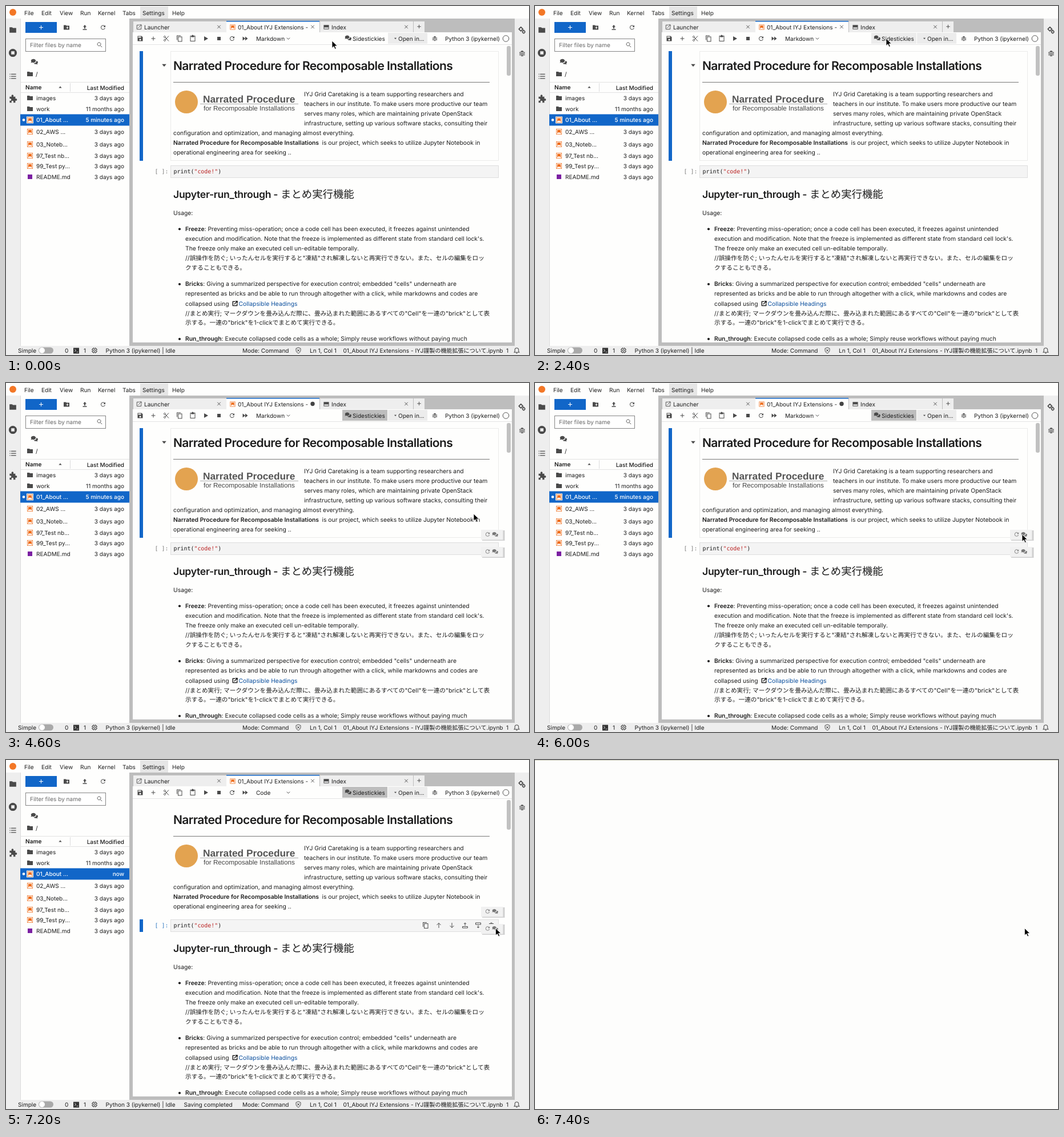
An HTML page for the animation above (8000 ms loop, 916 by 611 pixels).

```html
<!DOCTYPE html>
<html lang="en">
<head>
<meta charset="utf-8">
<title>Notebook side notes</title>
<style>
  html, body { margin: 0; width: 100%; height: 100%; overflow: hidden; background: #fefefd; }
  svg { display: block; width: 916px; height: 611px; }
  text { font: 10.05px Inter, "Noto Sans CJK JP", "Noto Sans CJK", sans-serif; fill: #1c1c1c;
         white-space: pre; text-rendering: geometricPrecision; }
  .body { font-size: 10.35px; }
  .jp { font-size: 10.65px; }
  .bold { font-weight: 600; }
  .medium { font-weight: 500; }
  .h1 { font-size: 21px; font-weight: 600; letter-spacing: -.58px; }
  .h2 { font-size: 17.6px; font-weight: 600; letter-spacing: -.3px; }
  .h2jp { font-size: 18.4px; }
  .mono { font: 9.95px "DejaVu Sans Mono", monospace; }
  .logo { font: bold 17.3px "Liberation Sans", sans-serif; fill: #555; }
  .sub { font: 11.7px "Liberation Sans", sans-serif; fill: #444; }
</style>
</head>
<body>
<svg id="stage" viewBox="0 0 916 611"></svg>
<script>
const BLUE = '#1166c8', INK = '#4a4a4a', GRAY = '#bdbdbd', LIGHT = '#eeeeee', PAPER = '#fefefd', ORANGE = '#ef6c1a';
const LOOP = 8000;

// Icon outlines on a 24-unit grid.
const SOLID = {
  folder: 'M10 4H2v16h20V6H12z',
  newFolder: 'M10 4H2v16h20V6H12zM14 9h2v3h3v2h-3v3h-2v-3h-3v-2h3z',
  save: 'M3 3h14l4 4v14H3zM5 5v4h10V5zM12 13a3 3 0 1 0 .1 0z',
  plus: 'M11 5h2v6h6v2h-6v6h-2v-6H5v-2h6z',
  play: 'M6 4v16l14-8z',
  stop: 'M4 4h16v16H4z',
  forward: 'M3 5v14l9-7zM12 5v14l9-7z',
  upload: 'M12 3l6 7h-4v6h-4v-6H6zM5 18h14v3H5z',
  refresh: 'M17.65 6.35A8 8 0 1 0 19.73 14h-2.08A6 6 0 1 1 16.2 7.8L13 11h7V4z',
  copy: 'M2 1h14v2H4v14H2zM6 5h15v18H6zM8 7v14h11V7z',
  paste: 'M3 2h6a3 3 0 0 1 6 0h6v20H3zM5 4v16h14V4h-2v3H7V4z',
  bubbles: 'M9 3a8 6 0 1 1-4 11.2L1 16l1.5-4A8 6 0 0 1 9 3zM19 9a6 5 0 0 1 2.5 9l1.5 3-4-1.3a8 6 0 0 1-9-2.7A10 8 0 0 0 19 9z',
  caretDown: 'M5 8h14l-7 8z',
  caretUp: 'M5 16h14l-7-8z',
  notebook: 'M2 2h20v20H2zM3.6 3.6v16.8h16.8V3.6zM6 6h12v12l-6-4.7L6 18z',
  terminal: 'M2 2h20v20H2zM6 7l4 4-4 4 1 1 5-5-5-5zM13 16h6v1.6h-6z',
  console: 'M2 4h20v16H2zM4 13v5h16v-5z',
  running: 'M12 2a10 10 0 1 1-.1 0zM8 8v8h8V8z',
  list: 'M3 5h2v2H3zM7 5h14v2H7zM3 11h2v2H3zM7 11h14v2H7zM3 17h2v2H3zM7 17h14v2H7z',
  puzzle: 'M9 5a3 3 0 1 1 4 0h6v6a3 3 0 1 1 0 5v6h-6a3 3 0 1 0-4 0H3v-6a3 3 0 1 0 0-5V5z',
  bug: 'M7 8a5 5 0 0 1 10 0v8a5 5 0 0 1-10 0zM3 8h18v2H3zM3 12h18v2H3zM3 16h18v2H3z'
};
const LINE = {
  cross: 'M6 6l12 12M18 6L6 18',
  chevron: 'M4 8l8 8 8-8',
  search: 'M10 3a6.5 6.5 0 1 1-.1 0zM15 15l6 6',
  up: 'M12 21V4M5 11l7-7 7 7',
  down: 'M12 3v17M5 13l7 7 7-7',
  above: 'M3 16h18v5H3zM12 13V3M8 7l4-4 4 4',
  below: 'M3 3h18v6H3zM12 12v9M8 17l4 4 4-4',
  trash: 'M4 6h16M6 6v15h12V6M9 3h6',
  shield: 'M12 2l8 3v6c0 5-3 9-8 11-5-2-8-6-8-11V5zM8 8l8 8M16 8l-8 8',
  bell: 'M4 18h16l-2-3v-5a6 6 0 0 0-12 0v5zM10 21h4',
  open: 'M13 4H4v16h16v-9M9 15L20 4M14 3h7v7',
  chip: 'M5 5h14v14H5zM9 9h6v6H9zM9 2v3M15 2v3M9 19v3M15 19v3M2 9h3M2 15h3M19 9h3M19 15h3',
  cut: 'M20 3L8 16M20 21L8 8M6 3a3 3 0 1 1-.1 0zM6 15a3 3 0 1 1-.1 0z',
  gears: 'M8 4a5 5 0 1 1-.1 0zM17 14a4 4 0 1 1-.1 0zM8 1v3M8 14v3M0 9h3M13 9h3M17 11v3M17 22v2'
};

const rect = (x, y, w, h, fill, extra = '') =>
  `<rect x="${x}" y="${y}" width="${w}" height="${h}" fill="${fill}" ${extra}/>`;
const circle = (x, y, r, fill, extra = '') => `<circle cx="${x}" cy="${y}" r="${r}" fill="${fill}" ${extra}/>`;
// y is the middle of the line of text
const text = (x, y, str, cls = '', extra = '') =>
  `<text x="${x}" y="${y + 3.7}" class="${cls}" ${extra}>${str}</text>`;
const rightText = (x, y, str, cls = '', extra = '') => text(x, y, str, cls, `text-anchor="end" ${extra}`);
const bold = str => `<tspan class="bold">${str}</tspan>`;
const group = (id, ...parts) => `<g id="${id}">${parts.join('')}</g>`;
function icon(name, x, y, size = 12, color = INK, weight = 2) {
  const paint = SOLID[name]
    ? `d="${SOLID[name]}" fill="${color}" fill-rule="evenodd"`
    : `d="${LINE[name]}" fill="none" stroke="${color}" stroke-width="${weight}"`;
  return `<path transform="translate(${x - size / 2} ${y - size / 2}) scale(${size / 24})" ${paint}/>`;
}

function menuBar() {
  const items = [['File', 32], ['Edit', 62], ['View', 94], ['Run', 130], ['Kernel', 161], ['Tabs', 204], ['Settings', 239], ['Help', 291]];
  return rect(235, 1, 49, 21, '#e6e6e6') + circle(12, 11, 6, '#f37726') +
    items.map(([label, x]) => text(x, 12, label)).join('');
}

function sideBars() {
  return rect(0, 22, 25, 573, LIGHT) + rect(891, 22, 25, 573, LIGHT) + rect(25, 22, 1, 573, '#dcdcdc') +
    icon('folder', 12, 42, 14) + icon('running', 12, 82, 17) + icon('list', 12, 123, 15) + icon('puzzle', 12, 163, 15) +
    icon('gears', 904, 42, 13, INK, 3) + icon('bug', 904, 83, 13);
}

function fileBrowser() {
  const files = [
    ['images', '3 days ago', 161, 'folder'], ['work', '11 months ago', 180, 'folder'],
    ['02_AWS ...', '3 days ago', 220, 'notebook'], ['03_Noteb...', '3 days ago', 242, 'notebook'],
    ['97_Test nb...', '3 days ago', 262, 'notebook'], ['99_Test py...', '3 days ago', 280, 'notebook'],
    ['README.md', '3 days ago', 299, '']
  ];
  const row = ([name, age, y, kind]) =>
    (kind ? icon(kind, 42, y, 12, kind === 'folder' ? INK : ORANGE) : rect(38, y - 4, 8, 8, '#7b1fa2')) +
    text(53, y, name) + rightText(207, y, age);
  const white = 'style="fill:#fff"';
  return rect(34, 28, 55, 19, BLUE) + icon('plus', 61.5, 37.5, 12, '#fff') +
    icon('newFolder', 106, 37.5, 12) + icon('upload', 138, 37.5, 12) + icon('refresh', 170, 37.5, 12) +
    rect(34.5, 57.5, 140, 22, '#fff', 'stroke="#858585"') +
    text(42, 68, 'Filter files by name', '', 'style="fill:#666"') + icon('search', 164, 68, 11) +
    icon('bubbles', 49.5, 97.5, 13) + icon('folder', 42, 119, 12) + text(52, 119, '/') +
    rect(26, 133, 190, 1, '#e2e2e2') + rect(26, 151, 190, 1, '#e2e2e2') + rect(112, 135, 1, 15, '#ddd') +
    text(34, 142.5, 'Name', 'bold') + icon('caretUp', 95, 142, 9) + rightText(207, 143, 'Last Modified', 'medium') +
    files.map(row).join('') +
    rect(25, 189.5, 191, 20, BLUE) + circle(31, 199.5, 2.3, '#fff') +
    rect(36, 193.5, 12, 12, '#fff') + icon('notebook', 42, 199.5, 12, ORANGE) +
    text(53, 199.5, '01_About ...', 'medium', white) +
    group('oldAge', rightText(207, 199.5, '5 minutes ago', 'medium', white)) +
    group('newAge', rightText(207, 199.5, 'now', 'medium', white));
}

function tabs() {
  return rect(216, 22, 675, 573, GRAY) + rect(222, 46, 664, 543, PAPER) +
    rect(223, 27, 163, 19, LIGHT) + rect(550, 27, 163, 19, LIGHT) + rect(714, 27, 19, 19, LIGHT) +
    icon('open', 233, 37, 11) + text(242, 37, 'Launcher') + icon('cross', 373, 36.5, 11) +
    rect(386, 26, 163, 21, PAPER) + rect(386, 26, 163, 1.5, BLUE) +
    icon('notebook', 397, 37, 11, ORANGE) +
    `<g clip-path="url(#tabClip)">${text(406, 37, '01_About IYJ Extensions - IYJ')}</g>` +
    group('tabClose', icon('cross', 537, 36.5, 11)) + group('tabDirty', circle(537, 36.5, 3.7, '#444')) +
    icon('console', 561, 37, 11) + text(570, 37, 'Index') + icon('cross', 701, 36.5, 11) + icon('plus', 723.5, 36, 11);
}

function toolbar() {
  const y = 57;
  const names = ['save', 'plus', 'cut', 'copy', 'paste', 'play', 'stop', 'refresh', 'forward'];
  return names.map((name, i) => icon(name, 235 + i * 23, y, name === 'stop' ? 9 : 12)).join('') +
    group('typeMarkdown', text(438, y, 'Markdown')) + group('typeCode', text(438, y, 'Code')) +
    icon('chevron', 494.5, y, 8, INK, 3) +
    rect(589, 47, 79, 19, LIGHT, 'id="toggle"') + icon('bubbles', 599, 56, 12) + text(607, y, 'Sidestickies') +
    rect(669, 47, 69, 19, '#ececec') + icon('caretDown', 682, y, 7) + text(687, y, 'Open in...') +
    icon('bug', 751, y, 11) + text(769, y, 'Python 3 (ipykernel)') + circle(875.5, 57, 5.3, 'none', 'stroke="#555"') +
    rect(222, 67, 664, 1, '#e4e4e4');
}

function article() {
  const lines = (x, list, cls = 'body') => list.map(([y, str]) => text(x, y, str, cls)).join('');
  return text(293, 108.3, 'Narrated Procedure for Recomposable Installations', 'h1') +
    rect(293, 133, 554, 1, '#777') +
    circle(316, 168, 20, '#e3a350') +
    text(345, 165, 'Narrated Procedure', 'logo') + rect(340, 171, 172, 1, '#aaa') +
    text(346, 178.8, 'for Recomposable Installations', 'sub') +
    lines(522, [
      [154, 'IYJ Grid Caretaking is a team supporting researchers and'],
      [171, 'teachers in our institute. To make users more productive our team'],
      [188, 'serves many roles, which are maintaining private OpenStack'],
      [205, 'infrastructure, setting up various software stacks, consulting their']]) +
    lines(293, [
      [222, 'configuration and optimization, and managing almost everything.'],
      [239.5, bold('Narrated Procedure for Recomposable Installations')],
      [256.5, 'operational engineering area for seeking ..'],
      [362, 'Usage:']]) +
    text(553.5, 239.5, 'is our project, which seeks to utilize Jupyter Notebook in', 'body') +
    text(293, 332, 'Jupyter-run_through - ', 'h2') + text(481, 332.5, 'まとめ実行機能', 'h2jp') +
    [390, 486.5, 582.5].map(y => circle(304, y + .5, 2.1, '#1c1c1c')).join('') +
    lines(314, [
      [390, bold('Freeze') + ': Preventing miss-operation; once a code cell has been executed, it freezes against unintended'],
      [407, 'execution and modification. Note that the freeze is implemented as different state from standard cell lock\'s.'],
      [424, 'The freeze only make an executed cell un-editable temporally.'],
      [486.5, bold('Bricks') + ': Giving a summarized perspective for execution control; embedded "cells" underneath are'],
      [503.5, 'represented as bricks and be able to run through altogether with a click, while markdowns and codes are'],
      [521, 'collapsed using'],
      [582.5, bold('Run_through') + ': Execute collapsed code cells as a whole; Simply reuse workflows without paying much']]) +
    lines(314, [
      [441, '//誤操作を防ぐ; いったんセルを実行すると"凍結"され解凍しないと再実行できない。また、セルの編集をロッ'],
      [458, 'クすることもできる。'],
      [538, '//まとめ実行; マークダウンを畳み込んだ際に、畳み込まれた範囲にあるすべての"Cell"を一連の"brick"として表'],
      [554.5, '示する。一連の"brick"を1-clickでまとめて実行できる。']], 'jp') +
    icon('open', 401, 521, 11, '#111', 3) + text(407.5, 521, 'Collapsible Headings', 'body', 'style="fill:#0b4f9e"');
}

function cells() {
  const tools = ['copy', 'up', 'down', 'above', 'below', 'trash'];
  const prompt = color => text(260.5, 289, '[ ]:', 'mono', `style="fill:${color}"`);
  return group('markdownActive',
      rect(234, 79, 6, 192, BLUE), icon('caretDown', 277, 104, 13),
      rect(288.5, 79.5, 574, 191, 'none', 'stroke="#d6d6d6" stroke-dasharray="1 1"'), prompt('#777')) +
    rect(288.5, 279.5, 574, 21, '#f4f4f4', 'stroke="#dedede"') +
    text(293.5, 289, 'print(<tspan fill="#ba2121">"code!"</tspan>)', 'mono') +
    group('codeActive', rect(234, 279, 6, 22, BLUE), prompt('#2673c0'),
      ...tools.map((name, i) => icon(name, 735 + i * 23, 289.5, 12))) +
    rect(877, 70, 7, 52, '#c1c1c1', 'rx="3"');
}

function sticky(y, id) {
  return rect(834, y - 7, 39.5, 18, '#bcbcbc', 'opacity=".7"') + rect(832, y - 8, 38.5, 17.5, '#f1f1f1') +
    group(id, icon('refresh', 843.5, y, 11, '#808080')) + icon('bubbles', 856.5, y, 11, '#777');
}

function statusBar() {
  const y = 603;
  return rect(0, 595, 916, 16, LIGHT) +
    text(21, y, 'Simple') + rect(57, 597.5, 26, 11, '#a9a9a9', 'rx="5.5"') + circle(63, y, 5, '#fff') +
    text(103, y, '0') + icon('terminal', 123, y + .5, 12, '#333') + text(136, y, '1') + icon('chip', 155, y, 12) +
    text(174.5, y, 'Python 3 (ipykernel) | Idle') + group('saved', text(311.5, y, 'Saving completed')) +
    text(414, y, 'Mode: Command') + icon('shield', 512, y, 12) + text(532, y, 'Ln 1, Col 1') +
    text(590.5, y, '01_About IYJ Extensions - IYJ謹製の機能拡張について.ipynb') +
    text(876, y, '1') + icon('bell', 894.5, y, 13);
}

const stage = document.getElementById('stage');
stage.innerHTML =
  '<clipPath id="tabClip"><rect x="400" y="28" width="131" height="18"/></clipPath>' +
  '<clipPath id="pageClip"><rect x="222" y="68" width="664" height="521"/></clipPath>' +
  rect(0, 0, 916, 611, PAPER) + menuBar() + sideBars() + fileBrowser() + tabs() + toolbar() +
  `<g clip-path="url(#pageClip)">${article()}${cells()}</g>` +
  group('stickies', sticky(265, 'firstSync'), sticky(295, 'secondSync')) + statusBar() +
  group('blank', rect(0, 0, 916, 611, '#fdfdfc'), rect(0, 0, 916, 1, '#d5d5c4')) +
  '<path id="cursor" d="M0 0v12.5l3-2.7 2.3 4.7 2-1-2.2-4.5h4.2z" fill="#000" stroke="#fff" stroke-width=".8"/>';

const parts = Object.fromEntries([...stage.querySelectorAll('[id]')].map(el => [el.id, el]));
const show = (id, on) => parts[id].setAttribute('visibility', on ? 'visible' : 'hidden');

// Pointer stops: time, x, y
const PATH = [[0, 571, 61], [500, 571, 61], [1700, 615, 57], [2800, 615, 57], [3300, 667, 104],
  [4600, 819, 229], [5200, 853, 265], [6300, 853, 265], [6700, 857.5, 294.5], [LOOP, 857.5, 294.5]];

function pointer(t) {
  const i = PATH.findIndex(([end]) => end > t);
  const [t0, x0, y0] = PATH[i - 1], [t1, x1, y1] = PATH[i];
  const k = (t - t0) / (t1 - t0);
  return [x0 + (x1 - x0) * k, y0 + (y1 - y0) * k];
}

function draw(time) {
  const t = Math.floor((time % LOOP) / 100) * 100;
  const [x, y] = pointer(t);
  const enabled = t >= 2500, saved = t >= 6200, codeActive = t >= 6800;

  parts.cursor.setAttribute('transform', `translate(${x} ${y})`);
  parts.toggle.setAttribute('fill', enabled ? GRAY : x >= 589 ? '#ececec' : PAPER);
  show('stickies', t >= 2700);
  const syncing = t < 3700;
  parts.secondSync.setAttribute('opacity', syncing ? .45 : 1);
  parts.secondSync.setAttribute('transform', `rotate(${syncing ? t * .36 : 0} 843.5 295)`);

  const dirty = t >= 2600 && !saved;
  show('tabDirty', dirty);
  show('tabClose', !dirty);
  show('saved', saved);
  show('oldAge', t < 6400);
  show('newAge', t >= 6400);
  show('typeMarkdown', !codeActive);
  show('typeCode', codeActive);
  show('markdownActive', !codeActive);
  show('codeActive', codeActive);
  show('blank', t >= 7300);
}

const start = performance.now();
function frame() {
  draw(performance.now() - start);
  requestAnimationFrame(frame);
}
draw(0);
requestAnimationFrame(frame);
</script>
</body>
</html>
```
